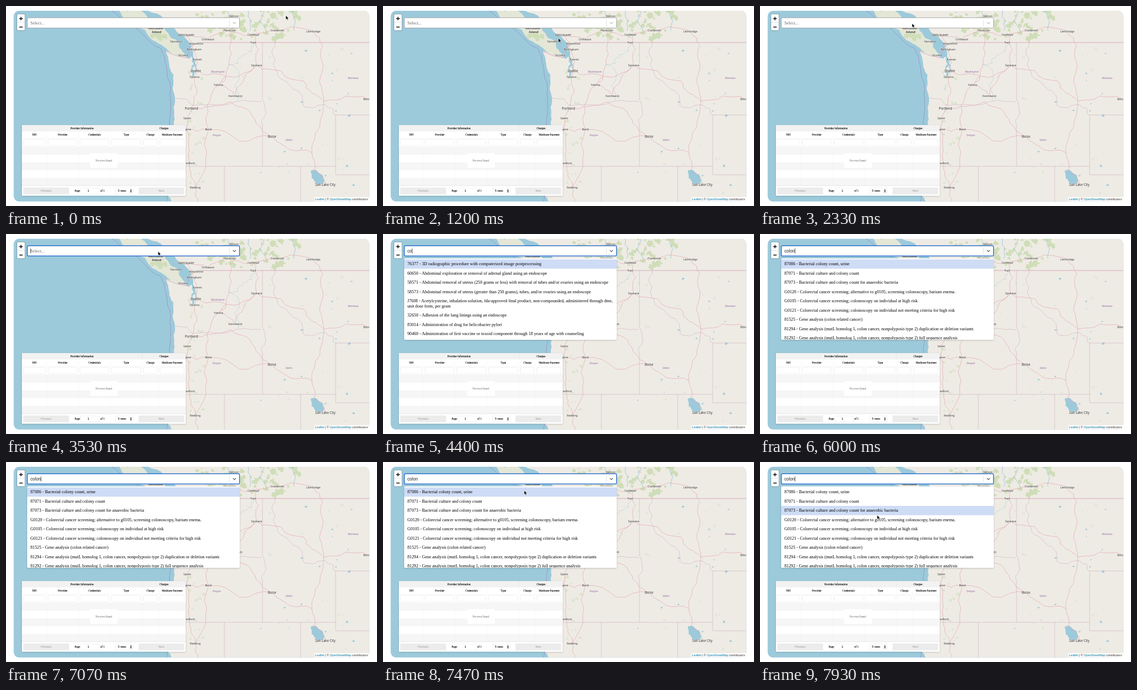
Write an HTML page that moves like this. It is 700x378 px and loops after 8 s.

```html
<!DOCTYPE html>
<html lang="en">
<head>
<meta charset="utf-8">
<title>Provider map search</title>
<style>
  html, body { margin: 0; width: 100%; height: 100%; overflow: hidden; background: #fff; }
  svg { display: block; width: 100%; height: 100%; }
  text { white-space: pre; }
  .serif { font-family: "Liberation Serif", serif; }
  .sans { font-family: "Liberation Sans", sans-serif; }
  .place { font-family: "Noto Sans", sans-serif; fill: #333; text-anchor: middle;
           paint-order: stroke; stroke: #f4f2ec; stroke-width: 1px; stroke-opacity: .7; }
  .state { font-style: italic; fill: #91669c; }
  .island { font-style: italic; font-weight: 600; }
  .mid { text-anchor: middle; }
  .line { fill: none; stroke-linejoin: round; stroke-linecap: round; }
</style>
</head>
<body>
<svg viewBox="0 0 700 378" preserveAspectRatio="none">
  <defs>
    <clipPath id="mapClip"><rect x="14.5" y="9" width="671" height="360.5" rx="10"/></clipPath>
    <clipPath id="menuClip"><rect x="40" y="46" width="401" height="154" rx="2"/></clipPath>
    <filter id="shadow" x="-10%" y="-10%" width="120%" height="125%">
      <feDropShadow dx="0" dy="1" stdDeviation="1.6" flood-opacity=".2"/>
    </filter>
  </defs>

  <g clip-path="url(#mapClip)">
    <rect width="700" height="378" fill="#9ccadb"/>
    <g id="map"></g>
    <rect x="581" y="361" width="105" height="9" fill="#fff" opacity=".75"/>
    <text x="583" y="367.2" font-size="5.75" class="sans" fill="#333"><tspan fill="#0078a8">Leaflet</tspan> | © <tspan fill="#0078a8">OpenStreetMap</tspan> contributors</text>
  </g>

  <g id="table"></g>

  <rect x="20" y="14.5" width="16.5" height="32.5" rx="2.5" fill="#000" opacity=".22"/>
  <rect x="21" y="15.5" width="14.5" height="30.5" rx="1.5" fill="#fff"/>
  <path stroke="#ccc" stroke-width=".6" d="M21 31H35.5"/>
  <path stroke="#000" stroke-width="1.4" d="M25 23.7H31.6M28.3 20.4V27M25.2 39.8H31.4"/>

  <rect id="field" x="40.2" y="22.2" width="400.4" height="19.4" rx="2" fill="#fff"/>
  <path stroke="#ccc" stroke-width=".6" d="M421.5 26.5V37.5"/>
  <path id="chevron" class="line" stroke-width="1.2" d="M428.4 30.8L431 33.4 433.6 30.8"/>
  <text id="hint" class="serif" x="46" y="34.6" font-size="8.4" fill="#666">Select...</text>
  <text id="query" class="sans" x="46" y="35" font-size="8.24" fill="#222"></text>
  <path id="caret" stroke="#000" stroke-width=".7" d="M0 27.3V36.6"/>

  <g id="menu">
    <rect x="40" y="46" width="401" height="154" rx="2" fill="#fff" filter="url(#shadow)"/>
    <g clip-path="url(#menuClip)">
      <rect id="highlight" x="40" width="401" height="17.55" fill="#cfdcf6"/>
      <g id="options" class="serif" font-size="8.24"></g>
    </g>
  </g>
  <path id="cursor" d="M0 0V7.6L1.8 6 3 8.8 4.3 8.2 3.1 5.5H5.5Z" stroke="#fff" stroke-width=".5"/>
</svg>

<script>
const $ = id => document.getElementById(id);

function add(parent, tag, attrs, content = "") {
  const node = document.createElementNS("http://www.w3.org/2000/svg", tag);
  for (const name in attrs) node.setAttribute(name, attrs[name]);
  node.textContent = content;
  parent.append(node);
  return node;
}

let seed = 7;
const random = () => (seed = seed * 16807 % 2147483647) / 2147483647;

// Splits every segment repeatedly, pushing each midpoint sideways.
function rough(points, sway, depth = 3) {
  if (!depth) return points;
  const finer = points.flatMap(([x, y], i) => {
    if (!i) return [[x, y]];
    const [px, py] = points[i - 1], push = (random() - .5) * sway;
    return [[(x + px) / 2 + (py - y) * push, (y + py) / 2 + (x - px) * push], [x, y]];
  });
  return rough(finer, sway, depth - 1);
}

const path = points => "M" + points.map(p => p.map(v => v.toFixed(1)).join(" ")).join("L");
const area = (points, fill) => add($("map"), "path", { d: path(points) + "Z", fill });
const line = (points, stroke, width) =>
  add($("map"), "path", { d: path(points), class: "line", stroke, "stroke-width": width });

function patches(count, x, y, width, height, size, fill) {
  for (let i = 0; i < count; i++) {
    const cx = x + random() * width, cy = y + random() * height, r = size * (.4 + random());
    const corners = [0, 1, 2, 3, 4, 0].map(k => {
      const angle = k * Math.PI * .4;
      return [cx + r * Math.cos(angle), cy + r * .8 * Math.sin(angle)];
    });
    area(rough(corners, .9, 2), fill);
  }
}

const WATER = "#9ccadb", FOREST = "#cfddb8", BORDER = "#cdaec0", ROAD = "#e6a9b3";

const cities = {
  Vancouver: [340, 55], Seattle: [358, 123], Portland: [350, 194], Boise: [502, 247], "Salt Lake City": [602.5, 337.5],
};
const towns = {
  Vernon: [430, 19], Penticton: [422.5, 46.5], Cranbrook: [512, 46.5], Lethbridge: [580, 48], Castlegar: [467, 54],
  Trail: [466, 69], Chilliwack: [381, 63], Abbotsford: [358.5, 71], Bellingham: [355, 82], Nanaimo: [321, 67],
  Victoria: [334, 93], Everett: [361, 101], Tacoma: [355.5, 134], Spokane: [473, 112], Yakima: [401, 149],
  Kennewick: [433, 170], Salem: [342, 212], Eugene: [340, 233.5], Bend: [382, 233.5], Medford: [345.5, 297],
  Redding: [357, 343.5], Billings: [683, 176],
};
const states = { Washington: [399.5, 124], Oregon: [397.5, 244], Idaho: [534, 253], Montana: [655, 136] };
const junctions = {
  South: [363, 372], Moses: [415, 133], Boardman: [425, 181], Baker: [472, 222], Pocatello: [577, 277],
  Missoula: [562, 142], Butte: [600, 180], Shelby: [598, 108],
};
const routes = [
  "Vancouver,Bellingham,Everett,Seattle,Tacoma,Portland,Salem,Eugene,Medford,Redding,South",
  "Seattle,Moses,Spokane,Missoula,Butte,Billings",
  "Portland,Boardman,Baker,Boise,Pocatello,Salt Lake City",
  "Lethbridge,Shelby,Butte,Pocatello",
  "Vancouver,Chilliwack,Penticton,Castlegar,Cranbrook,Lethbridge",
  "Vernon,Penticton,Moses,Yakima,Bend,Redding",
  "Moses,Yakima,Kennewick,Spokane,Castlegar",
  "Eugene,Bend,Boise",
];

function buildMap() {
  const coast = [[258, 9], [318, 42], [338, 60], [349, 74], [352, 94], [345, 100], [302, 85],
                 [308, 110], [316, 130], [319, 180], [317, 225], [304, 280], [309, 335], [303, 355], [315, 372]];
  area([...rough(coast, .25), [700, 372], [700, 0], [258, 0]], "#eeebe4");

  const island = [[208, 5], [262, 45], [298, 77], [332, 96], [338, 90], [323, 66], [296, 40], [250, 5], [208, 5]];
  area(rough(island, .25), "#e4e6d6");
  patches(9, 268, 48, 35, 18, 5, FOREST);

  patches(26, 360, 10, 75, 50, 5, FOREST);
  patches(30, 440, 8, 110, 58, 6, FOREST);
  patches(24, 345, 85, 30, 280, 3, "#dde4cd");
  patches(22, 440, 75, 200, 240, 2.5, "#e2e7d6");

  const sound = [[346, 80], [352, 96], [356, 110], [352, 134]];
  for (let i = 0; i < 3; i++) line(rough(sound, .6), WATER, 2);
  for (const x of [418, 457, 487, 540]) line(rough([[x, 9], [x + 3, 46]], .5), WATER, 1);
  line(rough([[470, 69], [447, 92], [420, 110], [438, 178]], .6), "#b3d3dd", .7);
  area(rough([[575, 311], [587, 312], [598, 322], [597, 338], [586, 336], [575, 311]], .4), WATER);
  patches(22, 480, 80, 200, 280, 1.8, WATER);

  const offshore = [[200, 9], [262, 57], [292, 80], [302, 112], [311, 155], [310, 205], [295, 290], [302, 372]];
  line(rough(offshore, .15), "#9a94c2", .9);
  line([[686, 69], [362, 69], [346, 78], [341, 98], [322, 94], [297, 84]], "#cf9fb4", .9);
  const columbia = [[482, 181], [439, 180], [395, 187], [350, 187], [342, 176], [319, 174]];
  const divide = [[507, 69], [507, 103], [535, 150], [560, 188], [605, 188], [622, 206]];
  [rough(columbia, .2), rough(divide, .4), [[484, 69], [484, 177]], rough([[484, 177], [490, 200], [484, 226]], .4),
   [[484, 226], [484, 303]], [[340, 303], [622, 303]], [[412, 303], [412, 372]], [[556, 303], [556, 372]],
   [[686, 206], [622, 206], [622, 319], [686, 319]]].forEach(points => line(points, BORDER, .6));

  const stops = { ...cities, ...towns, ...junctions };
  for (const route of routes) line(rough(route.split(",").map(name => stops[name]), .3), ROAD, .75);

  const label = (name, [x, y], size, kind = "") =>
    add($("map"), "text", { x, y: y + size * .36, "font-size": size, class: "place " + kind }, name);
  for (const name in cities) label(name, cities[name], 6.2);
  for (const name in towns) label(name, towns[name], 5.15);
  for (const name in states) label(name, states[name], 4.9, "state");
  label("Vancouver", [283, 42], 5.9, "island");
  label("Island", [284, 49], 5.9, "island");
}
buildMap();

function buildTable() {
  const table = $("table");
  const box = (x, y, width, height, fill, more = {}) => add(table, "rect", { x, y, width, height, fill, ...more });
  const label = (text, x, y, fill = "#000", font = "serif") =>
    add(table, "text", { x, y, fill, stroke: fill, "stroke-width": .1, "font-size": 5.2, class: font + " mid" }, text);
  const outline = { stroke: "#ddd", "stroke-width": .5, rx: 1.2 };

  box(30, 225, 309, 133.5, "#fff", { filter: "url(#shadow)" });
  box(30, 225, 309, 12, "#f2f2f2");
  for (let row = 0; row < 5; row += 2) box(30, 266.5 + row * 14.6, 309, 14.6, "#f6f6f6");
  label("Provider Information", 143.5, 233);
  label("Charges", 298, 233);

  const edges = [30, 77, 137, 197, 257, 288, 339];
  ["NPI", "Provider", "Credentials", "Type", "Charge", "Medicare Payment"].forEach((title, i) => {
    const left = edges[i], right = edges[i + 1];
    label(title, (left + right) / 2, 245.3);
    box(left + 2.5, 252, right - left - 5.5, 12, "#fff", outline);
    if (i) box(left - .2, 237, .4, 101, "#f0f0f0");
  });
  box(256.8, 225, .4, 12, "#ddd");
  for (const y of [249.8, 266]) box(30, y, 309, .4, "#e8e8e8");

  box(159, 278, 52, 28, "#fff", { opacity: .85 });
  label("No rows found", 184.5, 294, "#888");

  box(30, 338, 309, 2.5, "#f0f0f0");
  for (const [title, x] of [["Previous", 32.5], ["Next", 250]]) {
    box(x, 343, 86.5, 13, "#ececec", { rx: 1.5 });
    label(title, x + 43.2, 351.3, "#aaa", "sans");
  }
  label("Page", 134.5, 351.3);
  box(141, 344, 35, 11, "#fff", outline);
  label("1", 155.5, 351.3, "#000", "sans");
  label("of 1", 182, 351.3);
  box(206.5, 344, 33.5, 11, "#fff", outline);
  label("5 rows", 219, 351.3, "#000", "sans");
  add(table, "path", { d: "M234 348.8L235.7 346.5 237.4 348.8ZM234 350.3L235.7 352.6 237.4 350.3Z" });
}
buildTable();

const colonResults = [
  "87086 - Bacterial colony count, urine",
  "87071 - Bacterial culture and colony count",
  "87073 - Bacterial culture and colony count for anaerobic bacteria",
  "G0120 - Colorectal cancer screening; alternative to g0105, screening colonoscopy, barium enema.",
  "G0105 - Colorectal cancer screening; colonoscopy on individual at high risk",
  "G0121 - Colorectal cancer screening; colonoscopy on individual not meeting criteria for high risk",
  "81525 - Gene analysis (colon related cancer)",
  "81294 - Gene analysis (mutL homolog 1, colon cancer, nonpolyposis type 2) duplication or deletion variants",
  "81292 - Gene analysis (mutL homolog 1, colon cancer, nonpolyposis type 2) full sequence analysis",
];
const results = {
  co: [
    "76377 - 3D radiographic procedure with computerized image postprocessing",
    "60650 - Abdominal exploration or removal of adrenal gland using an endoscope",
    "58571 - Abdominal removal of uterus (250 grams or less) with removal of tubes and/or ovaries using an endoscope",
    "58573 - Abdominal removal of uterus (greater than 250 grams), tubes, and/or ovaries using an endoscope",
    "J7608 - Acetylcysteine, inhalation solution, fda-approved final product, non-compounded, administered through dme,\nunit dose form, per gram",
    "32650 - Adhesion of the lung linings using an endoscope",
    "83014 - Administration of drug for helicobacter pylori",
    "90460 - Administration of first vaccine or toxoid component through 18 years of age with counseling",
  ],
  col: [
    "00454 - Anesthesia for biopsy of collar bone",
    "00211 - Anesthesia for procedure to remove blood collection in brain",
    "55000 - Aspiration of fluid collection in testicle and sperm reservoir",
    "92537 - Assessment and recording of balance system during hot and cold irrigation of both ears",
    "87086 - Bacterial colony count, urine",
    "87071 - Bacterial culture and colony count",
    "87073 - Bacterial culture and colony count for anaerobic bacteria",
    "32607 - Biopsy of fluid collection in one lung using an endoscope",
    "20251 - Biopsy of spine bone at upper or lower spinal column, open procedure",
  ],
  colo: colonResults,
  colon: colonResults,
};

const MENU_TOP = 48, ROW = 17.5, LINE = 9.3;
const lists = new Map();
for (const items of new Set(Object.values(results))) {
  const group = add($("options"), "g", {});
  let y = MENU_TOP + 11.4;
  for (const item of items) {
    const lines = item.split("\n");
    lines.forEach((text, i) => add(group, "text", { x: 46, y: y + i * LINE }, text));
    y += ROW + (lines.length - 1) * LINE;
  }
  lists.set(items, group);
}

const LOOP = 8000;
// Focus and keystrokes: [time, query]
const typing = [[2400, ""], [3850, "c"], [4100, "co"], [4700, "col"], [5550, "colo"], [5750, "colon"]];
// Pointer moves: [start, end, x, y]
const moves = [[200, 1200, 331, 61], [1450, 2250, 287, 33], [7200, 7930, 221, 100.5]];

function cursorAt(t) {
  let x = 528, y = 18;
  for (const [start, end, toX, toY] of moves) {
    const p = Math.min(1, Math.max(0, (t - start) / (end - start))), ease = p * p * (3 - 2 * p);
    x += (toX - x) * ease;
    y += (toY - y) * ease;
  }
  return [x, y];
}

const show = (node, visible) => { node.style.display = visible ? "" : "none"; };

function render(t) {
  const last = typing.filter(key => key[0] <= t).pop();
  const query = last ? last[1] : "";
  const [x, y] = cursorAt(t);

  $("field").setAttribute("stroke", last ? "#2b6fce" : "#a0a0a0");
  $("field").setAttribute("stroke-width", last ? 1.5 : .9);
  $("chevron").setAttribute("stroke", last ? "#555" : "#bbb");
  show($("hint"), !query);
  $("query").textContent = query;
  show($("caret"), last && (t - last[0]) % 1060 < 530);
  const caretX = 46.4 + (query ? $("query").getComputedTextLength() : 0);
  $("caret").setAttribute("transform", `translate(${caretX})`);

  const items = results[query];
  show($("menu"), items);
  lists.forEach((group, key) => show(group, key === items));
  const hovered = t < 7200 ? 0 : Math.max(0, Math.floor((y - 1.5 - MENU_TOP) / ROW));
  $("highlight").setAttribute("y", MENU_TOP + hovered * ROW);

  show($("cursor"), t < 3850 || t > 7200);
  $("cursor").setAttribute("transform", `translate(${x} ${y})`);
}

function tick() {
  render(performance.now() % LOOP);
  requestAnimationFrame(tick);
}
tick();
</script>
</body>
</html>
```
